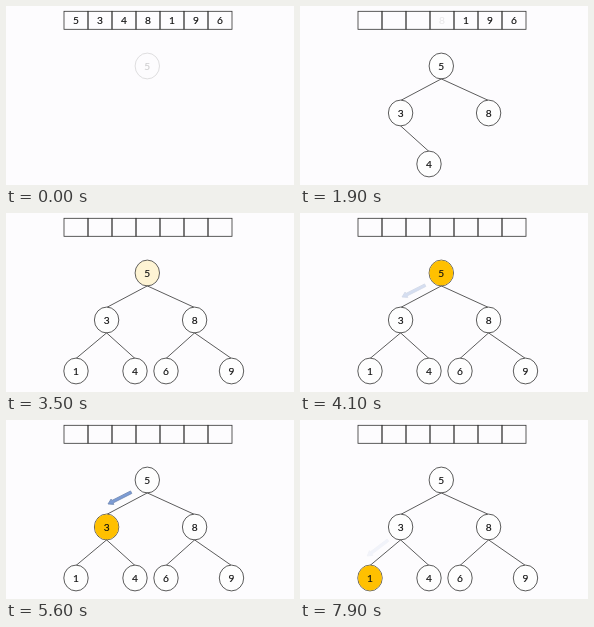
Animation, 288 px wide and 179 px high, one loop 8 s. Source, as an HTML page:

```html
<!DOCTYPE html>
<html lang="en">
<head>
<meta charset="utf-8">
<title>Binary search tree</title>
<style>
html, body { margin: 0; width: 100%; height: 100%; overflow: hidden; background: #fdfcfe; }
svg { display: block; width: 100vw; height: 100vh; }
text { font: 10.2px Lato, Carlito, sans-serif; text-anchor: middle; fill: #111; stroke: #111; stroke-width: .15; }
.ink { stroke: #333; stroke-width: .8; fill: none; }
.node { fill: #fefefe; }
.arrow { fill: #4472c4; stroke: #2f528f; stroke-width: .7; }
</style>
</head>
<body>
<svg viewBox="0 0 288 179"></svg>
<script>
const LOOP = 8000, STEP = 490, RADIUS = 12.5;
const svg = document.querySelector('svg');

// Insertion order: value, centre, index of the parent
const nodes = [
  [5, 141.3, 60], [3, 100.6, 107, 0], [4, 129, 158, 1], [8, 188.6, 107, 0],
  [1, 70, 158, 1], [9, 225.5, 158, 3], [6, 160, 158, 3]
];

function add(tag, attrs, parent = svg, text = '') {
  const el = document.createElementNS('http://www.w3.org/2000/svg', tag);
  for (const key in attrs) el.setAttribute(key, attrs[key]);
  el.textContent = text;
  return parent.appendChild(el);
}

const label = (value, x, y, parent) => add('text', { x, y: y + 3.6 }, parent, value);

const items = nodes.map(([value, x, y, parent], i) => {
  const cellX = 58 + 24 * i;
  add('rect', { class: 'ink', x: cellX, y: 5.3, width: 24, height: 18 });
  const digit = label(value, cellX + 12, 14.3);
  const group = add('g');
  if (parent !== undefined) {
    const [, px, py] = nodes[parent];
    add('line', { class: 'ink', x1: px, y1: py + RADIUS + .4, x2: x, y2: y - RADIUS }, group);
  }
  add('ellipse', { class: 'ink node', cx: x, cy: y, rx: 12.2, ry: RADIUS + .4 }, group);
  const glow = add('ellipse', { cx: x, cy: y, rx: 11.8, ry: RADIUS, fill: '#ffc000' }, group);
  label(value, x, y, group);
  return { digit, group, glow };
});

function arrow(x1, y1, x2, y2) {
  const length = Math.hypot(x2 - x1, y2 - y1);
  const angle = Math.atan2(y2 - y1, x2 - x1) * 180 / Math.PI;
  const neck = length - 5;
  return add('path', {
    class: 'arrow',
    transform: `translate(${x1} ${y1}) rotate(${angle})`,
    d: `M0-1.4H${neck}V-3L${length} 0L${neck} 3V1.4H0Z`
  });
}

// Element, fade-in start, fade-out start
const cues = [
  [items[0].glow, 3420, 4530],
  [arrow(125.2, 72.2, 102, 84), 4000, 5450],
  [items[1].glow, 4950, 6450],
  [arrow(88, 120.2, 67.2, 136), 5950, 7440],
  [items[4].glow, 6950, LOOP]
];

const ramp = (t, start, duration) => Math.min(1, Math.max(0, (t - start) / duration));

function draw() {
  const t = performance.now() % LOOP;
  items.forEach(({ digit, group, glow }, i) => {
    const start = STEP * i - 40;
    group.style.opacity = ramp(t, start, 220);
    digit.style.opacity = 1 - ramp(t, start + 260, 230);
    glow.style.opacity = 0;
  });
  for (const [el, on, off] of cues)
    el.style.opacity = ramp(t, on, 490) * (1 - ramp(t, off, 490));
  requestAnimationFrame(draw);
}
draw();
</script>
</body>
</html>
```
